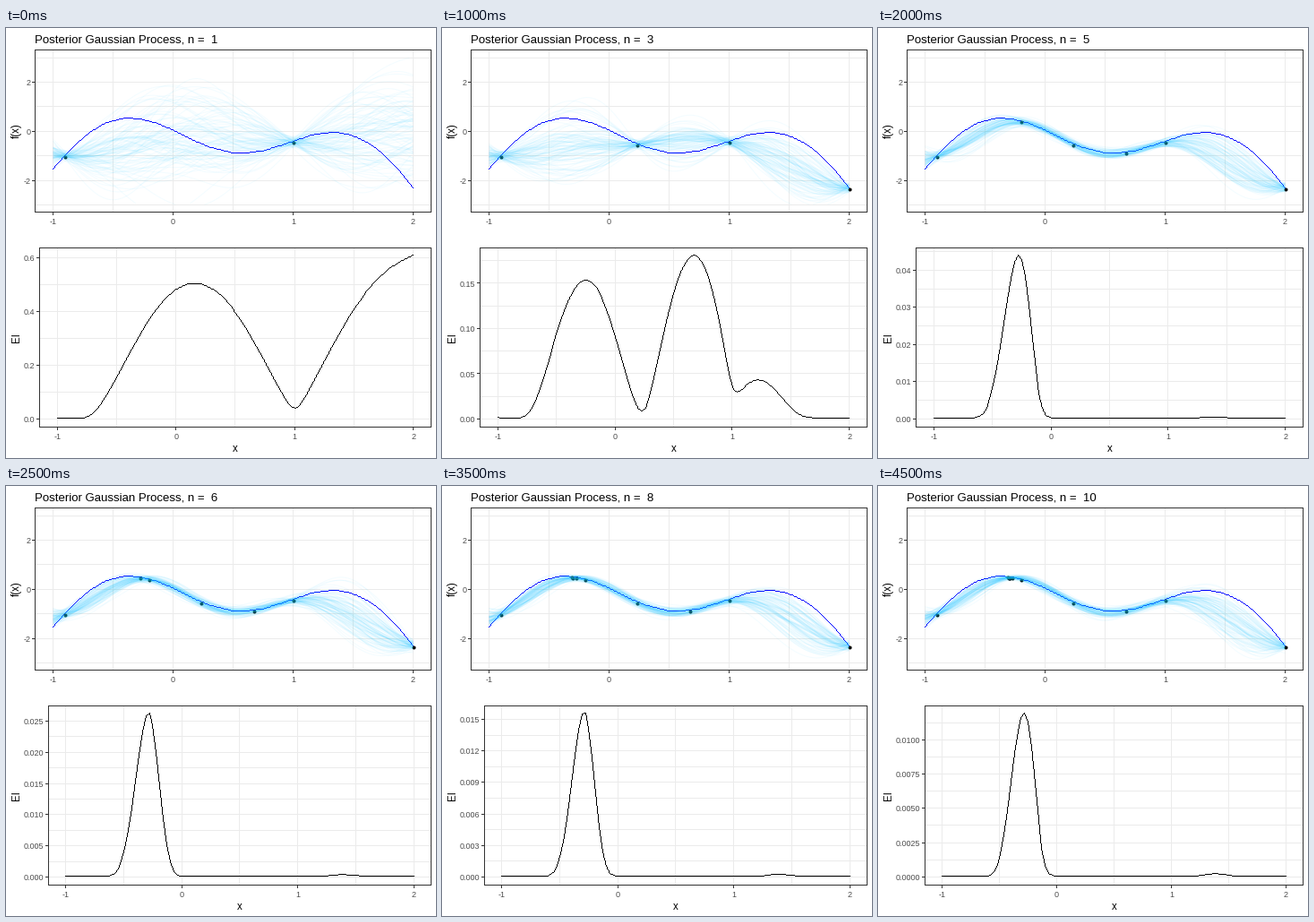
A matplotlib script for the animation above (5 s loop, 480 by 480 pixels).

```python
import math
import numpy as np
import matplotlib.pyplot as plt
from matplotlib.animation import FuncAnimation
from matplotlib.collections import LineCollection
from matplotlib.patches import Rectangle

SIZE = 480
LENGTH, NOISE, XI = 0.5, 0.1, 0.01
DRAWS = 100
GRID = np.linspace(-1, 2, 101)
DESIGN = np.array([-0.9, 1, 2, 0.235, 0.675, -0.205,
                   -0.28, -0.313, -0.308, -0.302, -0.297])
# tick step and decimals of the lower panel per step
STEPS = [(0.2, 1), (0.1, 1), (0.05, 2), (0.1, 1), (0.01, 2),
         (0.005, 3), (0.003, 3), (0.003, 3), (0.003, 3), (0.0025, 4)]
LEFT, RIGHT = 32.47, 474.5

plt.rcParams["font.family"] = "Liberation Sans"
fig = plt.figure(figsize=(SIZE / 72, SIZE / 72), dpi=72, facecolor="white")
ax = fig.add_axes([0, 0, 1, 1])


def objective(x):
    return -np.sin(3 * x) - x ** 2 + 0.7 * x


def kernel(a, b):
    return np.exp(-0.5 * ((a[:, None] - b[None, :]) / LENGTH) ** 2)


def posterior(at, xs):
    gain = kernel(at, xs) @ np.linalg.inv(kernel(xs, xs) + NOISE ** 2 * np.eye(len(xs)))
    return gain @ objective(xs), kernel(at, at) - gain @ kernel(xs, at)


def improvement(mean, cov, best):
    sd = np.sqrt(np.maximum(np.diag(cov), 1e-12))
    gap = mean - best - XI
    z = gap / sd
    cdf = np.array([0.5 * math.erfc(-v / math.sqrt(2)) for v in z])
    pdf = np.exp(-z ** 2 / 2) / math.sqrt(2 * math.pi)
    return gap * cdf + sd * pdf


def sample(mean, cov, seed):
    w, v = np.linalg.eigh(cov)
    root = v * np.sqrt(np.maximum(w, 0))
    noise = np.random.default_rng(seed).standard_normal((len(w), DRAWS))
    ys = mean[:, None] + root @ noise
    return np.where(np.abs(ys) > 3, np.nan, ys).T


def build(n):
    xs = DESIGN[:n + 1]
    mean, cov = posterior(GRID, xs)
    best = posterior(xs, xs)[0].max()
    return xs, sample(mean, cov, 40 + n), improvement(mean, cov, best)


STATES = [build(n) for n in range(1, 11)]


def rule(x, y, color, z):
    """Straight line, one whole pixel wide."""
    ax.plot(np.floor(x), np.floor(y), color=color, lw=1, zorder=z, antialiased=False)


def curve(x, y, color, z):
    """Hard-edged curve, one pixel per step along the longer axis."""
    pts = np.floor(np.column_stack([x, y]))
    dots = []
    for a, b in zip(pts, pts[1:]):
        count = int(np.abs(b - a).max())
        dots.append(np.round(np.linspace(a, b, count + 1)))
    dots = np.vstack(dots)
    ax.plot(dots[:, 0], dots[:, 1], ",", color=color, zorder=z)


def label(x, y, text, size=9, color="#4d4d4d", **kw):
    ax.text(x, y, text, fontsize=size, color=color, **kw)


def panel(left, top, bottom, px, py, yt, decimals):
    """Grid, border, ticks and tick labels; yt holds the major y breaks."""
    ystep = yt[1] - yt[0]
    for v in np.arange(-1, 2.1, 0.5):
        rule([px(v)] * 2, [top, bottom], "#ebebeb", 1)
    for v in np.arange(yt[0] - ystep / 2, yt[-1] + ystep * 0.6, ystep / 2):
        if top < py(v) < bottom:
            rule([left, RIGHT], [py(v)] * 2, "#ebebeb", 1)
    for v in range(-1, 3):
        rule([px(v)] * 2, [bottom, bottom + 3], "#333333", 7)
        label(px(v), bottom + 13.4, f"{v}", ha="center", va="baseline")
    for v in yt:
        rule([left - 3, left], [py(v)] * 2, "#333333", 7)
        label(left - 5.2, py(v) + 3.6, f"{v:.{decimals}f}", ha="right", va="baseline")
    x0, y0, x1, y1 = np.floor([left, top, RIGHT, bottom])
    ax.add_patch(Rectangle((x0, y0), x1 - x0, y1 - y0, fill=False,
                           ec="#333333", lw=1, zorder=8, antialiased=False))


def scale_x(left):
    return lambda v: left + (np.asarray(v) + 1.15) / 3.3 * (RIGHT - left)


def draw(i):
    ax.clear()
    ax.set(xlim=(0, SIZE), ylim=(SIZE, 0))
    ax.axis("off")
    xs, paths, ei = STATES[i]

    px = scale_x(LEFT)
    py = lambda v: 115.4 - np.asarray(v) * 27.42
    panel(LEFT, 24.9, 205.9, px, py, [-2, 0, 2], 0)
    gx = px(GRID)
    curve(gx, py(objective(GRID)), "#0000ff", 3)
    ax.scatter(np.floor(px(xs)) + 0.5, np.floor(py(objective(xs))) + 0.5,
               s=16, c="black", lw=0, zorder=4)
    ax.add_collection(LineCollection([np.column_stack([gx, py(y)]) for y in paths],
                                     colors=[(0.12, 0.82, 1, 0.05)], linewidths=1, zorder=5))
    label(32, 17, f"Posterior Gaussian Process, n =  {i + 1}", 13.25, "black")
    label(12, 115, "f(x)", 11.5, "black", rotation=90, ha="center", va="center")

    step, decimals = STEPS[i]
    left = LEFT + 5 * decimals
    peak = ei.max()
    px = scale_x(left)
    py = lambda v: 436.4 - np.asarray(v) / peak * 181.8
    panel(left, 245.5, 445.5, px, py, np.arange(0, peak * 1.05, step), decimals)
    curve(px(GRID), py(ei), "black", 6)
    label((left + RIGHT) / 2, 473, "x", 11.5, "black", ha="center")
    label(12, 345.5, "EI", 11.5, "black", rotation=90, ha="center", va="center")
    return []


anim = FuncAnimation(fig, draw, frames=10, interval=500, init_func=lambda: [],
                     repeat=True, repeat_delay=0)
plt.show()
```
